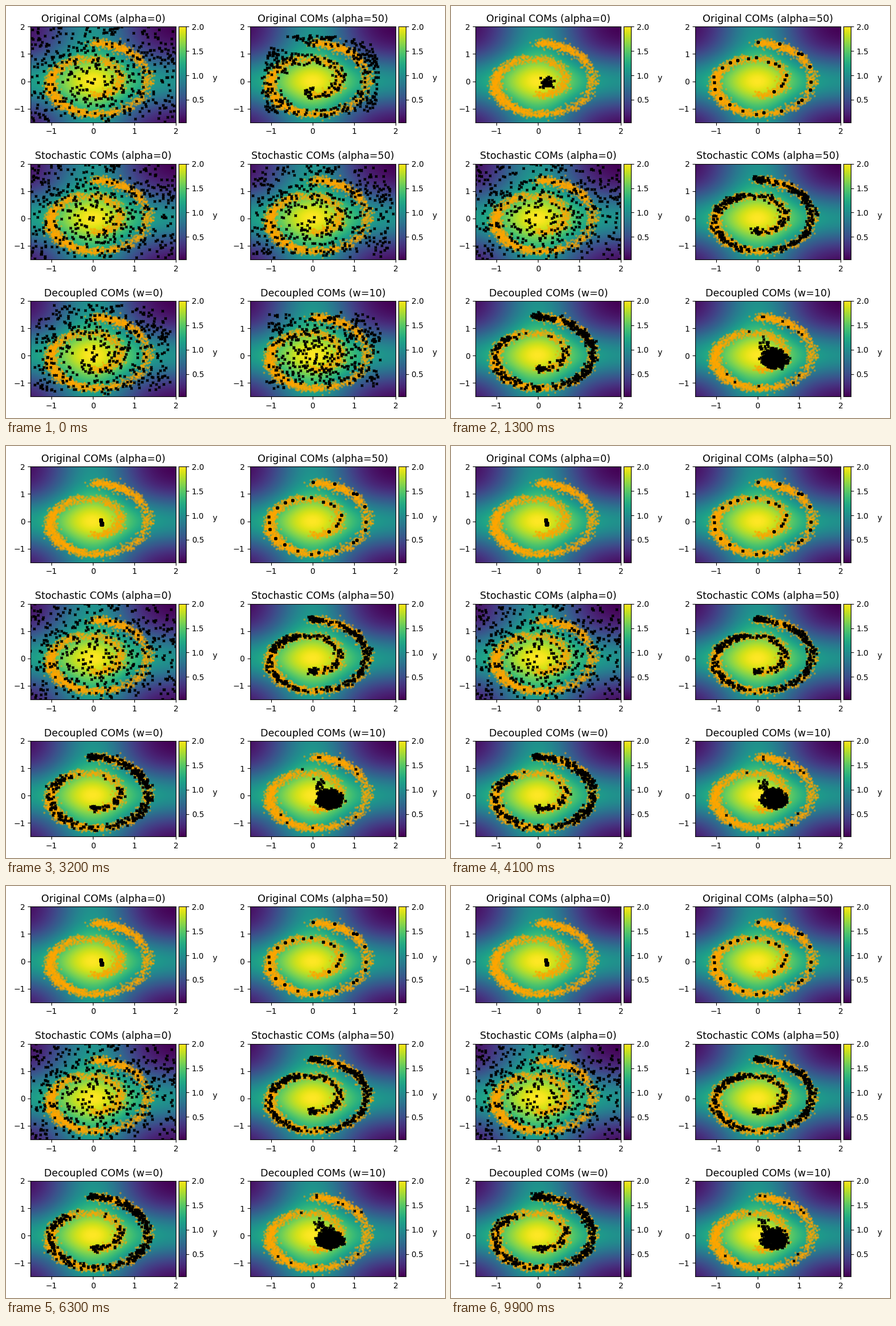
Recreate the animation shown at these times as a matplotlib script. Size 773 px wide and 725 px high, loop 10 s.

```python
import numpy as np
import matplotlib.pyplot as plt
from matplotlib.animation import FuncAnimation

W, H, DPI = 773, 725, 100
FRAMES, COUNT = 100, 450
LO, HI = -1.5, 2.0
T0, T1 = 1.5 * np.pi, 4.5 * np.pi
TITLES = [f"{name} COMs ({setting})"
          for name, settings in (("Original", ("alpha=0", "alpha=50")),
                                 ("Stochastic", ("alpha=0", "alpha=50")),
                                 ("Decoupled", ("w=0", "w=10")))
          for setting in settings]

rng = np.random.default_rng(7)
steps = np.arange(FRAMES)[:, None, None]


def spiral(t):
    u = (t - T0) / (T1 - T0)
    r = t / 10 + 0.09 * np.sin(np.pi * u ** 1.5)
    return np.stack([r * np.cos(t), r * np.sin(t)], -1)


def nearest(p, nodes):
    return np.linalg.norm(p[:, None] - nodes[None], axis=2).argmin(1)


def blend(start, goal, first, keep):
    """Paths that start part way to the goal and close in geometrically."""
    return goal + (start - goal) * (1 - first) * keep ** steps


def jitter(sd, floor=1.0):
    """Smooth noise whose size settles to a share of its initial value."""
    out = rng.normal(size=(FRAMES, COUNT, 2))
    for i in range(1, FRAMES):
        out[i] = 0.9 * out[i - 1] + 0.436 * out[i]
    return sd * (floor + (1 - floor) * np.exp(-steps / 20)) * out


def bump(u, center, width):
    return np.exp(-((u - center) / width) ** 2)


def make_data(n=2200):
    u = np.linspace(0, 1, 1500)
    weight = .4 + 1.3 * bump(u, .57, .13) + 1.6 * bump(u, 1, .1)
    u = rng.choice(u, n, p=weight / weight.sum())
    return spiral(T0 + u * (T1 - T0)) + rng.normal(0, .075, (n, 2))


def climb(p):
    """Everything runs into one small peak."""
    peak = np.where(rng.random((COUNT, 1)) < .06, (.196, .02), (.22, -.1))
    peak = peak + rng.uniform(-1, 1, (COUNT, 2)) * (.012, .035)
    rate = .4 + .46 * rng.random((COUNT, 1)) ** 1.6
    return blend(p, peak, 0, rate)


def settle(p, near):
    """Points reach the spiral, then slide into isolated optima."""
    t = np.linspace(T0 + .5, T1 - .1, 32) + rng.normal(0, .08, 32)
    wells = spiral(t) + rng.normal(0, .03, (32, 2))
    wells[0] = -.37, -.1
    on = spiral(near)
    goal = wells[nearest(on, wells)]
    return blend(p, on, .55, .5) + (goal - on) * (1 - .62 ** steps)


def wander(p):
    walk = rng.normal(size=(FRAMES, COUNT, 2)) * .04 * np.exp(-steps / 15)
    return np.clip(p + walk.cumsum(0), LO, HI)


def follow(p, t, first, keep, noise):
    t = np.clip(t + rng.normal(0, .15, COUNT), T0, T1)
    goal = spiral(t) + rng.normal(0, .045, (COUNT, 2))
    return blend(p, goal, first, keep) + noise


def skip_inner(near):
    """Move most of the inner turn outwards, keeping its tip."""
    gap = (near > 2.15 * np.pi) & (near < 2.75 * np.pi)
    gap &= rng.random(COUNT) < .9
    return near + gap * rng.uniform(1, 2, COUNT) * np.pi


def gather(p, strays=12, tail=38):
    """A dense blob with a short tail and a few strays on the spiral."""
    ang = rng.uniform(0, 2 * np.pi, COUNT)
    rad = rng.random(COUNT) ** .6
    goal = np.stack([.41 + .29 * rad * np.cos(ang),
                     -.13 + .33 * rad * np.sin(ang)], -1)
    goal[:strays] = spiral(rng.uniform(2.5 * np.pi, T1, strays))
    along = rng.random((tail, 1)) * (.3, -.5)
    goal[strays:strays + tail] = (.08, .55) + along + rng.normal(
        0, .06, (tail, 2))
    return blend(p, goal, .25, .72) + jitter(.045)


def make_paths():
    p = rng.uniform(LO, HI, (COUNT, 2))
    grid = np.linspace(T0, T1, 300)
    near = grid[nearest(p, spiral(grid))]
    return [climb(p), settle(p, near), wander(p),
            follow(p, near, .14, .7, jitter(.045, .5)),
            follow(p, skip_inner(near), .25, .68, jitter(.04)),
            gather(p)]


def box(x, y, w, h):
    return [x / W, 1 - (y + h) / H, w / W, h / H]


fig = plt.figure(figsize=(W / DPI, H / DPI), dpi=DPI, facecolor="white")
data = make_data()
g = np.exp(-np.linspace(LO, HI, 100) ** 2)
field = g[:, None] + g[None, :]
low = 2 * np.exp(-HI ** 2)
ramp = np.linspace(0, 1, 256)[:, None]
boxes = []

for k, title in enumerate(TITLES):
    x, y = 43.4 + 386.6 * (k % 2), 36.4 + 241.3 * (k // 2)
    boxes.append(box(x, y, 256, 168.2))
    ax = fig.add_axes(boxes[-1])
    ax.imshow(field, extent=(LO, HI, LO, HI), origin="lower", aspect="auto",
              cmap="viridis", vmin=low, vmax=2)
    ax.scatter(*data.T, s=8, color="orange", alpha=.5, linewidths=0)
    ax.set(xlim=(LO, HI), ylim=(LO, HI), xticks=range(-1, 3),
           yticks=range(-1, 3))
    ax.set_title(title, fontsize=12.6)

    bar = fig.add_axes(box(x + 261, y, 12.8, 168.2))
    bar.imshow(ramp, extent=(0, 1, low, 2), origin="lower", aspect="auto",
               cmap="viridis")
    bar.set(xticks=[], yticks=np.arange(.5, 2.1, .5))
    bar.yaxis.set_major_formatter("{x:.1f}")
    bar.yaxis.tick_right()
    fig.text((x + 324.6) / W, 1 - (y + 84) / H, "y", ha="center", va="top")

# Bake the static parts once; only the markers are redrawn
fig.canvas.draw()
backdrop = np.array(fig.canvas.buffer_rgba())
fig.clear()
fig.figimage(backdrop, origin="upper", zorder=-1)

paths = make_paths()
dots = []
for rect in boxes:
    ax = fig.add_axes(rect)
    ax.set(xlim=(LO, HI), ylim=(LO, HI))
    ax.axis("off")
    dots += ax.plot([], [], "kx", ms=2.3, mew=1.5)


def update(i):
    for dot, path in zip(dots, paths):
        dot.set_data(path[i, :, 0], path[i, :, 1])
    return dots


anim = FuncAnimation(fig, update, frames=FRAMES, interval=100, repeat=True,
                     repeat_delay=0)
plt.show()
```
